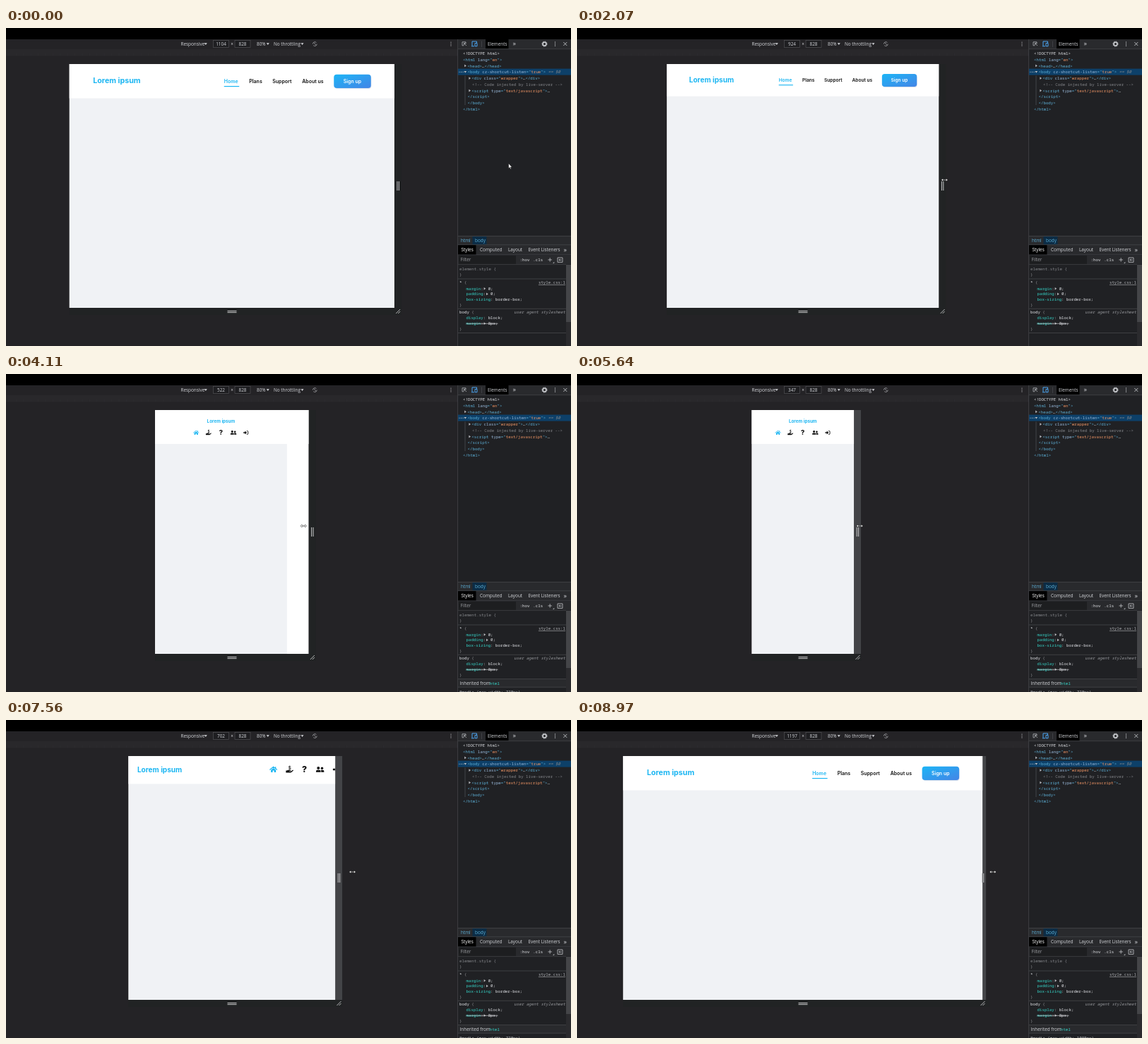
Animation, 800 px wide and 450 px high, one loop 9000 ms. Source, as an HTML page:

```html
<!DOCTYPE html>
<html lang="en">
<head>
<meta charset="utf-8">
<title>Responsive header</title>
<style>
html, body { margin: 0; width: 100%; height: 100%; overflow: hidden; background: #242326; }
svg { display: block; width: 100%; height: 100%; }
text { white-space: pre; }
.ui { font: 6.4px "Open Sans", "Noto Sans", sans-serif; fill: #d4d6da; }
.code { font: 5.78px "Noto Sans Mono", "DejaVu Sans Mono", monospace; fill: #e4e6ea; }
.site { font: 600 7px Inter, sans-serif; }
.mid { text-anchor: middle; }
.end { text-anchor: end; }
</style>
</head>
<body>
<svg id="stage" viewBox="0 0 800 450">
  <defs>
    <linearGradient id="blue" x2="1" y2="1"><stop stop-color="#1cb5f6"/><stop offset="1" stop-color="#4485e6"/></linearGradient>
    <clipPath id="clip"><rect id="clipBox" y="51" height="345"/></clipPath>
    <g id="home">
      <path d="M-5.2 .2L0 -4L5.2 .2" fill="none" stroke="currentColor" stroke-width="1.2" stroke-linecap="round"/>
      <path d="M-3.7 .8L0 -2.2L3.7 .8V4.3H1.1V1.7H-1.1V4.3H-3.7ZM2.5 -3.9H3.8V-1L2.5 -2Z"/>
    </g>
    <g id="hand">
      <path d="M-5.6 1.7H-4L-2.6 .7H1.3Q2.3 1.5 1.2 2.1H-.8V2.5H2L4.5 .8Q5.7 .5 5.5 1.7L2.6 4.3Q2 4.7 1.2 4.7H-5.6Z"/>
      <text class="site mid" x=".2" y="0" font-weight="700" style="font-size:6.4px">$</text>
    </g>
    <g id="help"><text class="site mid" y="4.7" style="font-size:13px;font-weight:800">?</text></g>
    <g id="users">
      <circle cx="-2.5" cy="-2" r="2.1"/><circle cx="3" cy="-1.8" r="1.8"/>
      <path d="M-6 4V2.8Q-6 .8 -4 .8H-1Q1 .8 1 2.8V4ZM1.7 4V2.7Q1.7 1.6 1 .8H4Q6 .8 6 2.7V4Z"/>
    </g>
    <g id="login">
      <path d="M-5 -1.2H-1.8V-3.5L2 0L-1.8 3.5V1.2H-5Z"/>
      <path d="M1.6 -3.4H3.2Q4.4 -3.4 4.4 -2.2V2.2Q4.4 3.4 3.2 3.4H1.6" fill="none" stroke="currentColor" stroke-width="1.3"/>
    </g>
  </defs>
  <rect width="800" height="450" fill="#242326"/>
  <rect width="800" height="16" fill="#000"/>
  <rect y="30" width="640" height="9.5" fill="#29282b"/>
  <path id="ticks" stroke="#323135" stroke-width=".5"/>
  <g id="bar"></g>

  <rect id="strip" y="51" width="10" height="345"/>
  <rect id="foot" y="396" height="10" fill="#212324"/>
  <rect id="page" y="51" height="345" fill="#fff"/>
  <g clip-path="url(#clip)">
    <rect id="body" y="51" height="345" fill="#f0f2f5"/>
    <rect id="gap" y="51" width="10" height="345" fill="#fff"/>
    <rect id="head" y="51" fill="#fff"/>
    <text id="logo" class="site" fill="#1cb6f2">Lorem ipsum</text>
    <g id="nav" class="site" fill="#111">
      <text x="-241" y="26.7" fill="#1cb6f2">Home</text>
      <rect x="-241" y="31" width="21.5" height="1.2" fill="#1cb6f2"/>
      <text x="-205.5" y="26.7">Plans</text>
      <text x="-172.5" y="26.7">Support</text>
      <text x="-130.5" y="26.7">About us</text>
      <rect x="-84.5" y="16" width="52" height="19" rx="4" fill="#9fb4d0" opacity=".45"/>
      <rect x="-85.5" y="14.8" width="52.5" height="19.2" rx="4" fill="url(#blue)"/>
      <text x="-59.3" y="26.7" class="mid" fill="#fff">Sign up</text>
    </g>
    <g id="icons"></g>
  </g>
  <path d="M313.5 400.5H326.5M313.5 402.6H326.5" stroke="#c9c9cb"/>
  <path id="grip" d="M-3 3L3 -3M0 3L3 0" stroke="#c9c9cb" stroke-width=".9"/>
  <path id="bars" d="M-1.2 217V230M1.2 217V230" stroke="#c9c9cb"/>
  <g id="panel"></g>
  <path id="arrow" d="M0 0V7.2L1.6 5.8L2.7 8.2L3.8 7.7L2.8 5.4H4.9Z" fill="#fff" stroke="#000" stroke-width=".5"/>
  <path id="resize" d="M-4.6 0L-2.2 -2V-.6H2.2V-2L4.6 0L2.2 2V.6H-2.2V2Z" fill="#fff" stroke="#000" stroke-width=".4"/>
</svg>
<script>
const LOOP = 9000, MID = 319.75, SCALE = 5 / 12;
const $ = id => document.getElementById(id);
const set = (el, attrs) => { for (const k in attrs) el.setAttribute(k, attrs[k]); };
const show = (el, on) => set(el, { visibility: on ? 'visible' : 'hidden' });

function add(parent, tag, attrs, text) {
  const el = document.createElementNS('http://www.w3.org/2000/svg', tag);
  set(el, attrs);
  if (text) el.textContent = text;
  return parent.appendChild(el);
}
const box = (g, x, y, width, height, fill, more) => add(g, 'rect', { x, y, width, height, fill, ...more });
const line = (g, d, stroke, more) => add(g, 'path', { d, stroke, fill: 'none', 'stroke-width': .8, ...more });
const ui = (g, x, y, s, more) => add(g, 'text', { class: 'ui', x, y, ...more }, s);
const drop = (g, x, y) => add(g, 'path', { d: `M${x} ${y}h4l-2 2.8z`, fill: '#d4d6da' });

// Code line: colour and text alternate
function code(g, x, y, ...parts) {
  const row = add(g, 'text', { class: 'code', x, y });
  for (let i = 0; i < parts.length; i += 2) add(row, 'tspan', { fill: parts[i] }, parts[i + 1]);
  return row;
}

const TAG = '#5db0d7', ATTR = '#9bbbdc', VAL = '#f29766', GREY = '#85878b', TEXT = '#e4e6ea', PROP = '#35d4c7', EDGE = '#46474b';

// Device toolbar
const bar = $('bar');
ui(bar, 247.5, 25, 'Responsive'); drop(bar, 280.8, 21.3);
for (const x of [293.5, 324]) box(bar, x, 17.5, 22, 10, '#1e1e21', { stroke: '#505155', 'stroke-width': .7 });
const size = ui(bar, 304.5, 25, '1104', { class: 'ui mid' });
ui(bar, 320, 25, '×', { class: 'ui mid' });
ui(bar, 335, 25, '828', { class: 'ui mid' });
ui(bar, 355, 25, '80%'); drop(bar, 368.8, 21.3);
ui(bar, 379, 25, 'No throttling'); drop(bar, 417.5, 21.3);
line(bar, 'M434.4 22.6a2.9 2.9 0 0 1 5 -2M440.2 22.6a2.9 2.9 0 0 1 -5 2M436 20.6l3 4', '#a2a4a8');
line(bar, 'M630 19.8v1M630 22.2v1M630 24.6v1', '#c4c6ca', { 'stroke-width': 1.1 });
let ticks = '';
for (let x = 4; x < 640; x += 10.4) ticks += `M${x} 36v3.5`;
$('ticks').setAttribute('d', ticks);

// Inspector
const p = $('panel');
box(p, 640, 16, 160, 434, '#202124');
box(p, 640, 16, 160, 13.5, '#292a2d');
box(p, 679, 16, 32.5, 13.5, '#000');
line(p, 'M639.6 16V450M640 29.7H800', EDGE);
line(p, 'M646 19.8h5v2M646 19.8v5h2M648.6 21.6l3.4 3.4M648.6 24.4v-2.8h2.8', '#b4b6ba');
line(p, 'M660 25.5v-6.5h6.5v2M659 25.8h4M664 21.5h3v4.3h-3z', '#4aa3f0', { 'stroke-width': 1 });
line(p, 'M673.5 18.5V27', EDGE);
ui(p, 682, 25, 'Elements', { fill: '#fff' });
ui(p, 717.6, 25, '»', { style: 'font-size:9px' });
add(p, 'circle', { cx: 762.5, cy: 22.6, r: 2.5, fill: 'none', stroke: '#c4c6ca', 'stroke-width': 1.7 });
add(p, 'circle', { cx: 762.5, cy: 22.6, r: 3.6, fill: 'none', stroke: '#c4c6ca', 'stroke-width': .9, 'stroke-dasharray': '1.4 1.43' });
line(p, 'M777.5 19.6v1.1M777.5 22.1v1.1M777.5 24.6v1.1', '#c4c6ca', { 'stroke-width': 1.1 });
line(p, 'M789.3 20l5 5M794.3 20l-5 5', '#d4d6da');
box(p, 640, 57.6, 160, 9, '#0d4069');
line(p, 'M650 67.5V109', '#5a5d62', { 'stroke-width': .6 });
line(p, 'M641.5 62.3h1M644 62.3h1M646.5 62.3h1', '#c4c6ca', { 'stroke-width': 1 });
add(p, 'path', { d: 'M649.2 51.5l2.6 1.9l-2.6 1.9zM648.4 61h3.8l-1.9 2.6zM655.4 69.2l2.6 1.9l-2.6 1.9zM655.4 86.7l2.6 1.9l-2.6 1.9z', fill: '#b8babe' });
code(p, 647, 38.3, TEXT, '<!DOCTYPE html>');
code(p, 647, 47, TAG, '<html ', ATTR, 'lang', TAG, '="', VAL, 'en', TAG, '">');
code(p, 653.3, 55.7, TAG, '<head>', TEXT, '…', TAG, '</head>');
const tree = code(p, 653.5, 64.4, TAG, '<body ', ATTR, 'cz-shortcut-listen', TAG, '="', VAL, 'true', TAG, '">', GREY, ' == $0');
tree.lastChild.setAttribute('font-style', 'italic');
code(p, 659.3, 73.2, TAG, '<div ', ATTR, 'class', TAG, '="', VAL, 'wrapper', TAG, '">', TEXT, '…', TAG, '</div>');
code(p, 660, 82, GREY, '<!-- Code injected by live-server -->');
code(p, 659.3, 90.7, TAG, '<script ', ATTR, 'type', TAG, '="', VAL, 'text/javascript', TAG, '">', TEXT, '…');
code(p, 653.5, 99.4, TAG, '<\/script>');
code(p, 653.5, 108.2, TAG, '</body>');
code(p, 647, 117, TAG, '</html>');

box(p, 640, 294.5, 160, 26, '#292a2d');
box(p, 660.5, 295, 20, 11.5, '#0c2c45');
line(p, 'M640 294.5H800M640 306.8H800M640 320.8H800M640 334.6H793', EDGE);
ui(p, 644, 303.2, 'html', { fill: TAG, style: 'fill:' + TAG });
ui(p, 664, 303.2, 'body', { style: 'fill:' + TAG });
box(p, 640, 307.2, 25.5, 13.3, '#000');
ui(p, 644.5, 316.4, 'Styles', { style: 'fill:#fff' });
ui(p, 671, 316.4, 'Computed');
ui(p, 711, 316.4, 'Layout');
ui(p, 739.5, 316.4, 'Event Listeners');
ui(p, 789.5, 316.6, '»', { style: 'font-size:9px' });
box(p, 640, 321.2, 160, 13, '#292a2d');
box(p, 641, 322, 81, 12, '#1d1e20');
ui(p, 643.5, 330.4, 'Filter', { style: 'fill:#9a9ca0' });
code(p, 727.5, 330, TEXT, ':hov');
code(p, 746.3, 330, TEXT, '.cls');
line(p, 'M767.5 328h5.4M770.2 325.3v5.4M774.5 332.6h1.4v-1.4M781 325h7v6.4h-7zM786.6 328.2h-3.6M784.4 326.8l-1.5 1.4l1.5 1.4', '#c4c6ca');

code(p, 642, 342.5, GREY, 'element.style {');
code(p, 642, 351, GREY, '}');
code(p, 642, 362, TEXT, '* ', GREY, '{');
add(p, 'text', { class: 'code end', x: 792, y: 362, style: 'fill:#b4b6ba', 'text-decoration': 'underline' }, 'style.css:1');
// Property, value, and whether the row can unfold
const rule = (y, name, value, fold) => {
  if (fold) add(p, 'path', { d: `M${652 + name.length * 3.47 + 3.8} ${y - 3.9}l2.6 1.9l-2.6 1.9z`, fill: '#b8babe' });
  return code(p, 651.5, y, PROP, name, TEXT, (fold ? ':  ' : ': ') + value + ';');
};
rule(370.8, 'margin', '0', true);
rule(378.4, 'padding', '0', true);
rule(386, 'box-sizing', 'border-box');
code(p, 642, 393.6, GREY, '}');
const italic = { 'font-style': 'italic' };
set(code(p, 642, 404, TEXT, 'body ', GREY, '{'), italic);
add(p, 'text', { class: 'code end', x: 792, y: 404, style: 'fill:#97999d;font-style:italic' }, 'user agent stylesheet');
set(rule(412.4, 'display', 'block'), italic);
set(rule(420.2, 'margin', '8px', true), { ...italic, 'text-decoration': 'line-through' });
code(p, 642, 428, GREY, '}');
line(p, 'M640 355H793M640 397.3H793M640 431.5H793', EDGE);
const inherited = add(p, 'g', {});
box(inherited, 640, 432, 153, 11, '#292a2d');
line(inherited, 'M640 443.2H793', EDGE);
ui(inherited, 642.5, 439.7, 'Inherited from');
code(inherited, 685, 439.7, PROP, 'html');
const media = code(inherited, 642, 451.6, '#c4c6ca', '@media');
box(p, 793, 335, 7, 115, '#2b2b2e');
box(p, 793, 335, 7, 81, '#444548');

const icons = ['home', 'hand', 'help', 'users', 'login'].map((id, i) =>
  add($('icons'), 'use', { href: '#' + id, fill: i ? '#111' : '#1cb6f2', color: i ? '#111' : '#1cb6f2' }));
const iconAt = [-107, -84, -63, -41, -18];

// Monotone cubic through [time, value] points
function curve(pts) {
  const slope = i => (pts[i + 1][1] - pts[i][1]) / (pts[i + 1][0] - pts[i][0]);
  const tan = pts.map((_, i) => {
    if (!i || i === pts.length - 1) return slope(i ? i - 1 : 0);
    const a = slope(i - 1), b = slope(i);
    return a * b > 0 ? 2 * a * b / (a + b) : 0;
  });
  return t => {
    if (t <= pts[0][0]) return pts[0][1];
    const i = pts.findIndex(q => q[0] >= t) - 1;
    if (i < 0) return pts[pts.length - 1][1];
    const h = pts[i + 1][0] - pts[i][0], u = (t - pts[i][0]) / h, v = 1 - u;
    return v * v * ((1 + 2 * u) * pts[i][1] + u * h * tan[i]) + u * u * ((3 - 2 * u) * pts[i + 1][1] - v * h * tan[i + 1]);
  };
}
const width = curve([[0, 1104], [1350, 1104], [1550, 1092], [1860, 1002], [2070, 924], [2790, 839], [3150, 774], [3720, 608],
  [4110, 522], [4650, 373], [4950, 351], [5400, 347], [6270, 347], [6600, 400], [7170, 575], [7560, 702], [8100, 896], [8970, 1221]]);
// How far the page layout runs ahead of the frame, in ms
const lead = curve([[2070, 0], [3150, 120], [4110, 240], [5400, 0], [6270, 0], [7560, 135], [8400, 0]]);
const pushX = curve([[6270, 0], [6900, 6.5]]);
const mouseX = curve([[0, 711.6], [120, 711.6], [850, 562], [1200, 558]]);
const mouseY = curve([[0, 191.5], [120, 191.5], [850, 214], [1200, 215]]);

function layout(css, left, right) {
  const wide = css > 820, small = css <= 720, stacked = css <= 450;
  const s = css > 1080 ? 1 : .94;
  const k = stacked ? .74 : small ? .84 : 1;
  const mid = (left + right) / 2;
  set($('head'), { x: left - 10, width: 700, height: wide ? 48.5 * s : stacked ? 48 : small ? 33.2 : 39.5 });
  set($('logo'), {
    x: stacked ? mid : left + (wide ? 33.5 * s : small ? 11.5 : 12.5),
    y: wide ? 51 + 27.4 * s : stacked ? 69 : small ? 70 : 74,
    'text-anchor': stacked ? 'middle' : 'start',
    style: `font-size:${stacked ? 6.3 : small ? 7.5 : 10.7 * s}px;font-weight:700`
  });
  show($('nav'), wide);
  show($('icons'), !wide);
  set($('nav'), { transform: `translate(${right} 51) scale(${s})` });
  icons.forEach((icon, i) => {
    const x = stacked ? mid + (i - 2) * 17.6 : right + iconAt[i] * k;
    set(icon, { transform: `translate(${x} ${stacked ? 83 : small ? 67 : 70}) scale(${k * .95})` });
  });
}

function draw(t) {
  const outer = width(t), inner = width(t + lead(t));
  const shown = t > 8100 ? width(t - 65) : outer;
  const left = MID - outer * SCALE / 2, w = outer * SCALE;
  const edge = MID + shown * SCALE / 2;
  const right = left + inner * SCALE;

  size.textContent = Math.round(shown);
  set($('strip'), { x: edge, fill: t >= 5000 ? '#434447' : '#212324' });
  set($('foot'), { x: left, width: w + 10 });
  for (const id of ['page', 'clipBox']) set($(id), { x: left, width: w });
  set($('body'), { x: left, width: inner * SCALE });
  set($('gap'), { x: left });
  show($('gap'), t >= 3090 && t < 3210);
  set($('bars'), { transform: `translate(${edge + 5.4} 0)` });
  set($('grip'), { transform: `translate(${edge + 5.4} 401)` });
  layout(inner, left, right);

  show(inherited, t >= 2610);
  media.firstChild.textContent = `@media (max-width: ${t >= 3900 && t < 8400 ? 720 : 1080}px)`;

  const held = t >= 850;
  show($('arrow'), !held);
  show($('resize'), held);
  const x = t < 1350 ? mouseX(t) : MID + inner * SCALE / 2 + 8.2 + pushX(t);
  set($(held ? 'resize' : 'arrow'), { transform: `translate(${x} ${mouseY(t)})` });
}

function tick() {
  draw(performance.now() % LOOP);
  requestAnimationFrame(tick);
}
tick();
</script>
</body>
</html>
```
